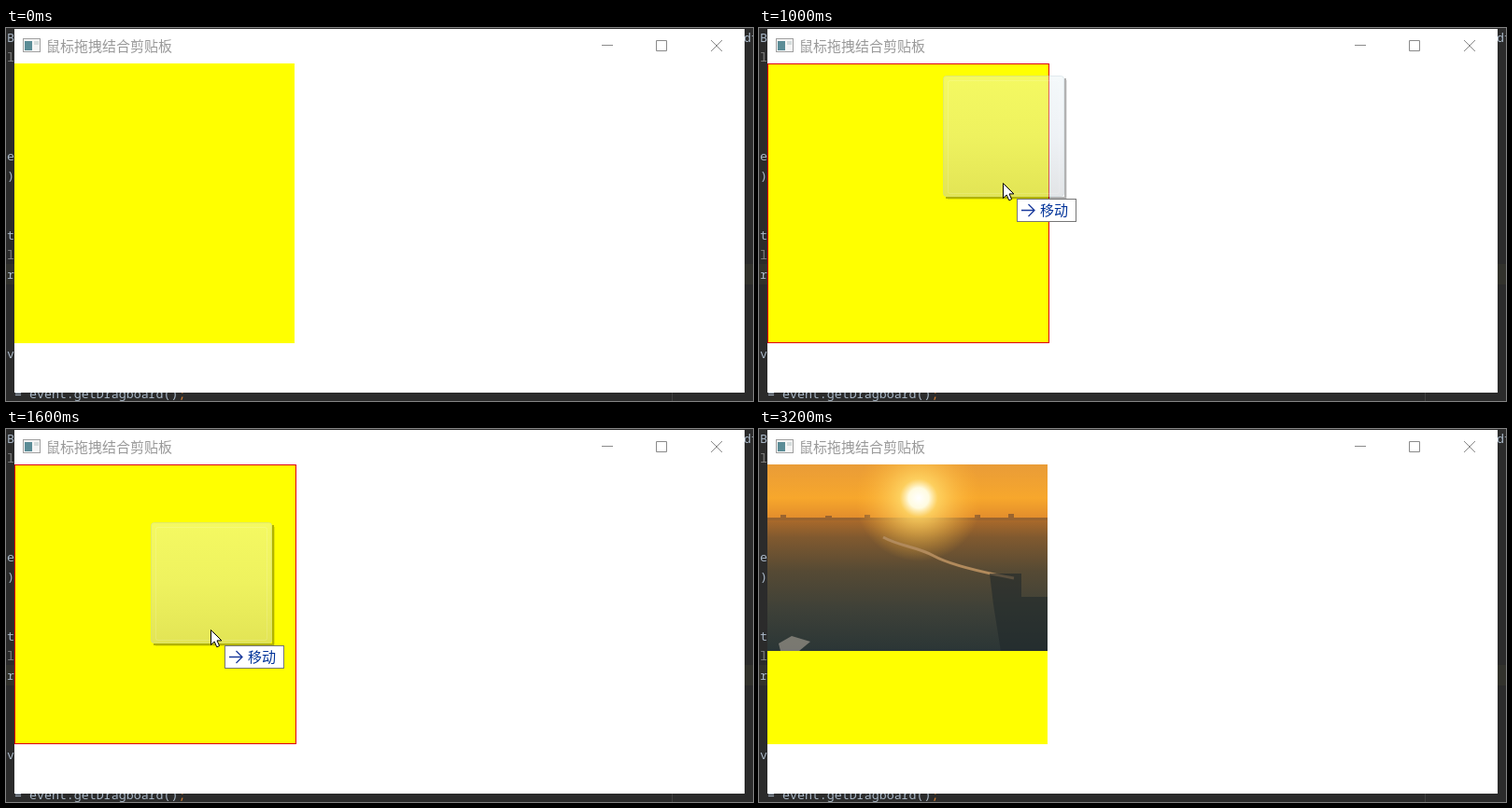
An HTML page that plays this animation: 800 px wide and 400 px high, repeating every 3800 ms.

```html
<!DOCTYPE html>
<html lang="zh-CN">
<head>
<meta charset="utf-8">
<title>鼠标拖拽结合剪贴板</title>
<style>
  html, body { margin: 0; width: 100%; height: 100%; overflow: hidden; background: #2b2b2b; }
  svg { display: block; width: 800px; height: 400px; }
  .code { font: 13.3px "Noto Sans Mono", "DejaVu Sans Mono", monospace; fill: #a9b7c6; }
  .ui { font: 15px "Noto Sans CJK SC", "Noto Sans CJK", sans-serif; }
  .line { fill: none; stroke: #8a8a8a; }
</style>
</head>
<body>
<svg viewBox="0 0 800 400">
  <defs>
    <linearGradient id="glass" x2="0" y2="1">
      <stop offset="0" stop-color="#e4f0f4" stop-opacity=".4"/>
      <stop offset=".5" stop-color="#d6dfe8" stop-opacity=".41"/>
      <stop offset="1" stop-color="#bcc1c6" stop-opacity=".43"/>
    </linearGradient>
    <linearGradient id="sky" x2="0" y2="1">
      <stop offset="0" stop-color="#e99c38"/>
      <stop offset=".6" stop-color="#f7a72c"/>
      <stop offset="1" stop-color="#e08a2c"/>
    </linearGradient>
    <linearGradient id="city" x2="0" y2="1">
      <stop offset="0" stop-color="#b06c2a"/>
      <stop offset=".15" stop-color="#80592f"/>
      <stop offset=".4" stop-color="#564a34"/>
      <stop offset=".7" stop-color="#3d4038"/>
      <stop offset="1" stop-color="#2b3636"/>
    </linearGradient>
    <radialGradient id="sun">
      <stop offset="0" stop-color="#fff"/>
      <stop offset=".16" stop-color="#fffbe0"/>
      <stop offset=".3" stop-color="#ffd766" stop-opacity=".85"/>
      <stop offset="1" stop-color="#ffb02e" stop-opacity="0"/>
    </radialGradient>
    <clipPath id="frame"><rect width="300" height="200"/></clipPath>
  </defs>

  <rect width="800" height="400" fill="#2b2b2b"/>
  <rect id="caretRow" y="253" width="800" height="22" fill="#32322c"/>
  <path d="M713.5 391V400" stroke="#404040"/>
  <g id="editor" class="code"></g>

  <rect x="9" y="1" width="782" height="390" fill="#fff"/>
  <g>
    <rect x="18.5" y="11.5" width="18" height="14" fill="#f4f4f4" stroke="#a0a0a0"/>
    <rect x="20" y="14" width="8" height="10" fill="#5b8c96"/>
    <rect x="30" y="14" width="5" height="4" fill="#d5dcdc"/>
  </g>
  <text class="ui" x="43" y="25" fill="#999">鼠标拖拽结合剪贴板</text>
  <path class="line" d="M638 18.5H650M696.5 13.5H707.5V24.5H696.5ZM755 13L767 25M767 13L755 25"/>

  <rect x="9" y="38" width="300" height="300" fill="#ff0"/>
  <rect id="dropBorder" x="9.5" y="38.5" width="301" height="299" fill="#ff0" stroke="#e00000"/>

  <g id="photo" transform="translate(9 38)" clip-path="url(#frame)">
    <rect width="300" height="60" fill="url(#sky)"/>
    <rect y="57" width="300" height="143" fill="url(#city)"/>
    <path d="M0 60V57H14V54H20V57H62V55H69V57H104V54H110V57H222V54H228V57H258V53H264V57H300V60Z" fill="#9a642f"/>
    <circle cx="162" cy="36" r="68" fill="url(#sun)"/>
    <path d="M124 78C142 88 160 88 178 98S232 116 264 122" fill="none" stroke="#b18a5c" stroke-width="3"/>
    <path d="M238 117H272V142H300V200H250L242 150Z" fill="#20282a" opacity=".6"/>
    <path d="M12 192L26 184L46 190L34 200H14Z" fill="#9b958a" opacity=".7"/>
  </g>

  <g id="pointer">
    <g id="thumb" transform="translate(-64 -115)">
      <path d="M3 131H131V3" fill="none" stroke="#000" stroke-opacity=".3" stroke-width="2"/>
      <path d="M5 132.5H132.5V5" fill="none" stroke="#000" stroke-opacity=".1"/>
      <rect x=".5" y=".5" width="129" height="129" rx="3" fill="url(#glass)" stroke="#b4c8d2" stroke-opacity=".35"/>
      <rect x="5.5" y="5.5" width="119" height="121" rx="2" fill="none" stroke="#fff" stroke-opacity=".15"/>
    </g>
    <path d="M.5 .5V16.5L4.2 13L6.8 18.8L9.6 17.6L7 11.9H11.9Z" fill="#fff" stroke="#000"/>
    <g id="denied" fill="none">
      <circle cx="27.7" cy="29" r="6.8" stroke="#541410" stroke-width="2.4"/>
      <path d="M23 24.3L32.4 33.7" stroke="#541410" stroke-width="2.4"/>
      <circle cx="27.7" cy="29" r="6.8" stroke="#b8241a" stroke-width="1.2"/>
    </g>
    <g id="moveTip">
      <rect x="15.5" y="17.5" width="63" height="24" fill="#fff" stroke="#767676"/>
      <path d="M20 29.5H34M27.5 23L34 29.5L27.5 36" fill="none" stroke="#1a3a9c" stroke-width="1.3"/>
      <text class="ui" x="40" y="35" fill="#003399">移动</text>
    </g>
  </g>
</svg>
<script>
  const LOOP = 3800, ENTER = 1000, DROP = 2200, LEAVE = 3200;
  const byId = id => document.getElementById(id);
  const show = (id, on) => byId(id).setAttribute('display', on ? 'inline' : 'none');

  // Visible fragments of the code editor behind the window: [row, x, text]
  const fragments = [
    [0, 1, 'B'], [0, 790, 'dt'], [1, 1, 'l'], [6, 1, 'e'], [7, 1, ')'], [10, 1, 't'],
    [11, 1, 'l'], [12, 1, 'r'], [16, 1, 'v'],
    [18, 9, '= event.getDragboard()<tspan fill="#cc7832">;</tspan>']
  ];
  byId('editor').innerHTML = fragments.map(([row, x, text]) =>
    `<text x="${x}" y="${15 + row * 21.2}"${text === 'l' ? ' fill="#808080"' : ''}>${text}</text>`).join('');

  // Pointer positions, each held until the next: [time, x, y]
  const track = [
    [600, 664, 189], [800, 424, 151], [1000, 261, 166], [1200, 233, 189],
    [1400, 219, 211], [1600, 219, 215], [2200, 240, 249], [2400, 281, 297],
    [2600, 338, 330], [2800, 331, 332], [3000, 322, 354]
  ];

  function draw(t) {
    const spot = track.filter(([time]) => time <= t).pop();
    const over = t >= ENTER && t < DROP;
    show('pointer', spot && t < LEAVE);
    if (spot) byId('pointer').setAttribute('transform', `translate(${spot[1]} ${spot[2]})`);
    show('thumb', t < DROP);
    show('denied', t < ENTER);
    show('moveTip', over);
    show('dropBorder', over);
    show('photo', t >= DROP);
    show('caretRow', t < 600 || t >= 800);
  }

  const start = performance.now();
  function tick() {
    draw((performance.now() - start) % LOOP);
    requestAnimationFrame(tick);
  }
  tick();
</script>
</body>
</html>
```
